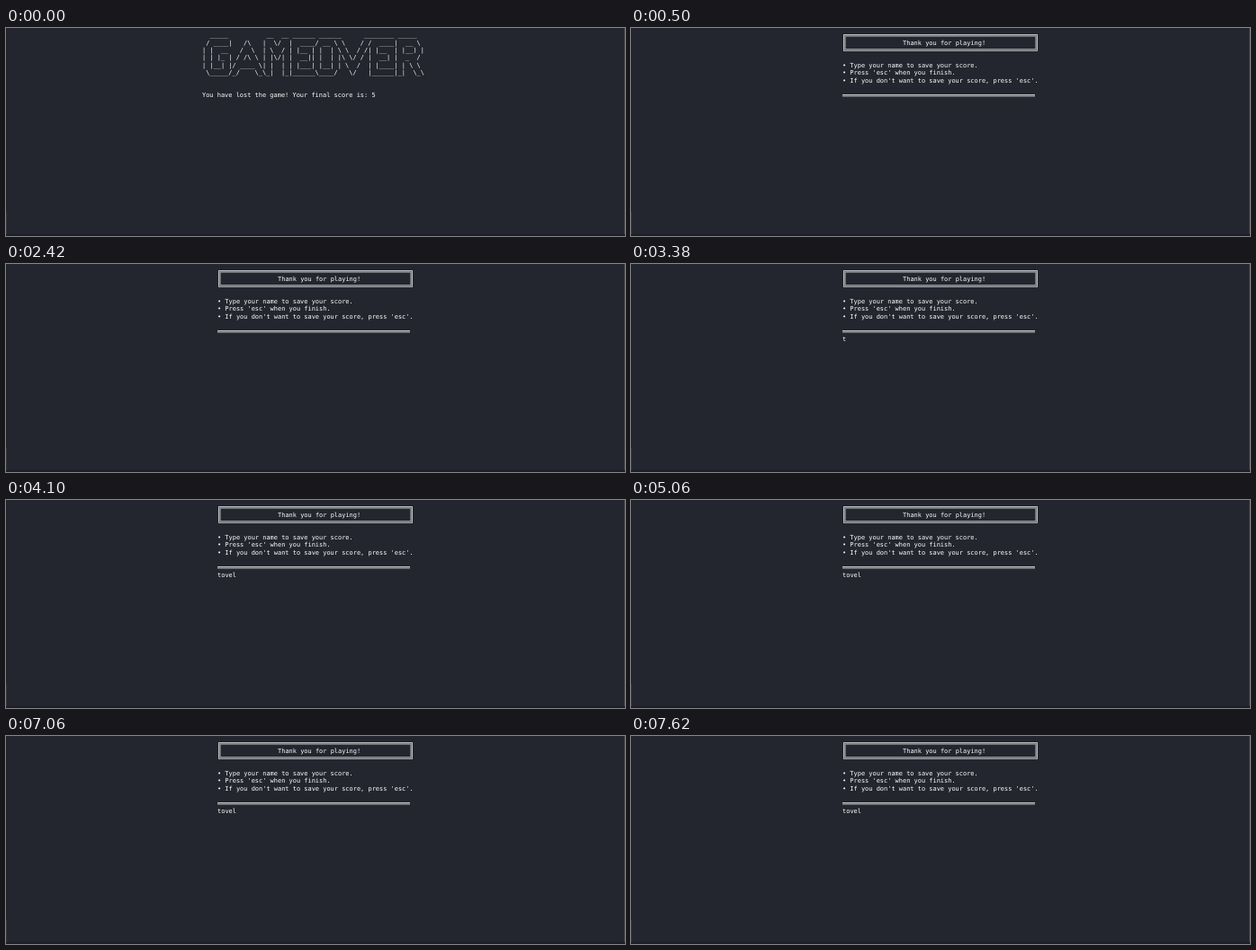
An HTML page that plays this animation: 688 by 232 pixels, repeating every 8000 ms.

```html
<!DOCTYPE html>
<html lang="en">
<head>
<meta charset="utf-8">
<title>Game over</title>
<style>
  html, body { margin: 0; width: 100%; height: 100%; overflow: hidden; background: #23262e; }
  svg { display: block; width: 688px; height: 232px; }
  text {
    font: 6.96px "DejaVu Sans Mono", monospace;
    fill: #fff;
    white-space: pre;
    text-rendering: geometricPrecision;
  }
  .rule { fill: none; stroke: #c2c4c6; stroke-width: 1; }
</style>
</head>
<body>
<svg id="stage" viewBox="0 0 688 232">
  <rect width="688" height="232" fill="#23262e"/>
  <rect width="1" height="205" fill="#1f2226"/>
  <rect y="205" width="1" height="25" fill="#30333a"/>
  <rect x="687" width="1" height="230" fill="#444448"/>
  <rect y="230" width="688" height="2" fill="#1b1d27"/>
  <g id="over"></g>
  <g id="thanks">
    <rect class="rule" x="236.5" y="7.5" width="215" height="17.8"/>
    <rect class="rule" x="238" y="9" width="212" height="14.8"/>
    <path class="rule" d="M235 74.5H449M235 76H449"/>
  </g>
</svg>
<script>
const LOOP = 8000, CELL = 4.19, ROW = 8.36, BASE = 10.4;
const over = document.getElementById("over");
const thanks = document.getElementById("thanks");

function print(group, x, row, str) {
  const el = document.createElementNS("http://www.w3.org/2000/svg", "text");
  el.setAttribute("x", x);
  el.setAttribute("y", BASE + row * ROW);
  el.textContent = str;
  group.append(el);
  return el;
}

// Visible from `from` to `to` within each loop, with hard cuts.
function show(el, from, to) {
  const frames = [
    { offset: 0, opacity: from ? 0 : 1 },
    { offset: from / LOOP, opacity: 1 },
    { offset: to / LOOP, opacity: to < LOOP ? 0 : 1 },
    { offset: 1, opacity: to < LOOP ? 0 : 1 }
  ].map(f => ({ ...f, easing: "steps(1, end)" }));
  el.animate(frames, { duration: LOOP, iterations: Infinity });
}

const banner = String.raw`
  _____          __  __ ______ ______      ________ _____
 / ____|   /\   |  \/  |  ____/ __ \ \    / /  ____|  __ \
| |  __   /  \  | \  / | |__ | |  | \ \  / /| |__  | |__) |
| | |_ | / /\ \ | |\/| |  __|| |  | |\ \/ / |  __| |  _  /
| |__| |/ ____ \| |  | | |___| |__| | \  /  | |____| | \ \
 \_____/_/    \_\_|  |_|______\____/   \/   |______|_|  \_\
`;
banner.split("\n").slice(1, 7).forEach((line, i) => print(over, 218, i, line));
print(over, 218, 8, "You have lost the game! Your final score is: 5");

const LEFT = 235;
print(thanks, LEFT + 16 * CELL, 1, "Thank you for playing!");
print(thanks, LEFT, 4, "• Type your name to save your score.");
print(thanks, LEFT, 5, "• Press 'esc' when you finish.");
print(thanks, LEFT, 6, "• If you don't want to save your score, press 'esc'.");

show(over, 0, 500);
show(thanks, 500, LOOP);

const typed = [["t", 3380], ["o", 3460], ["v", 3940], ["e", 4020], ["l", 4100]];
typed.forEach(([key, at], i) => show(print(thanks, LEFT + i * CELL, 9, key), at, LOOP));
</script>
</body>
</html>
```
